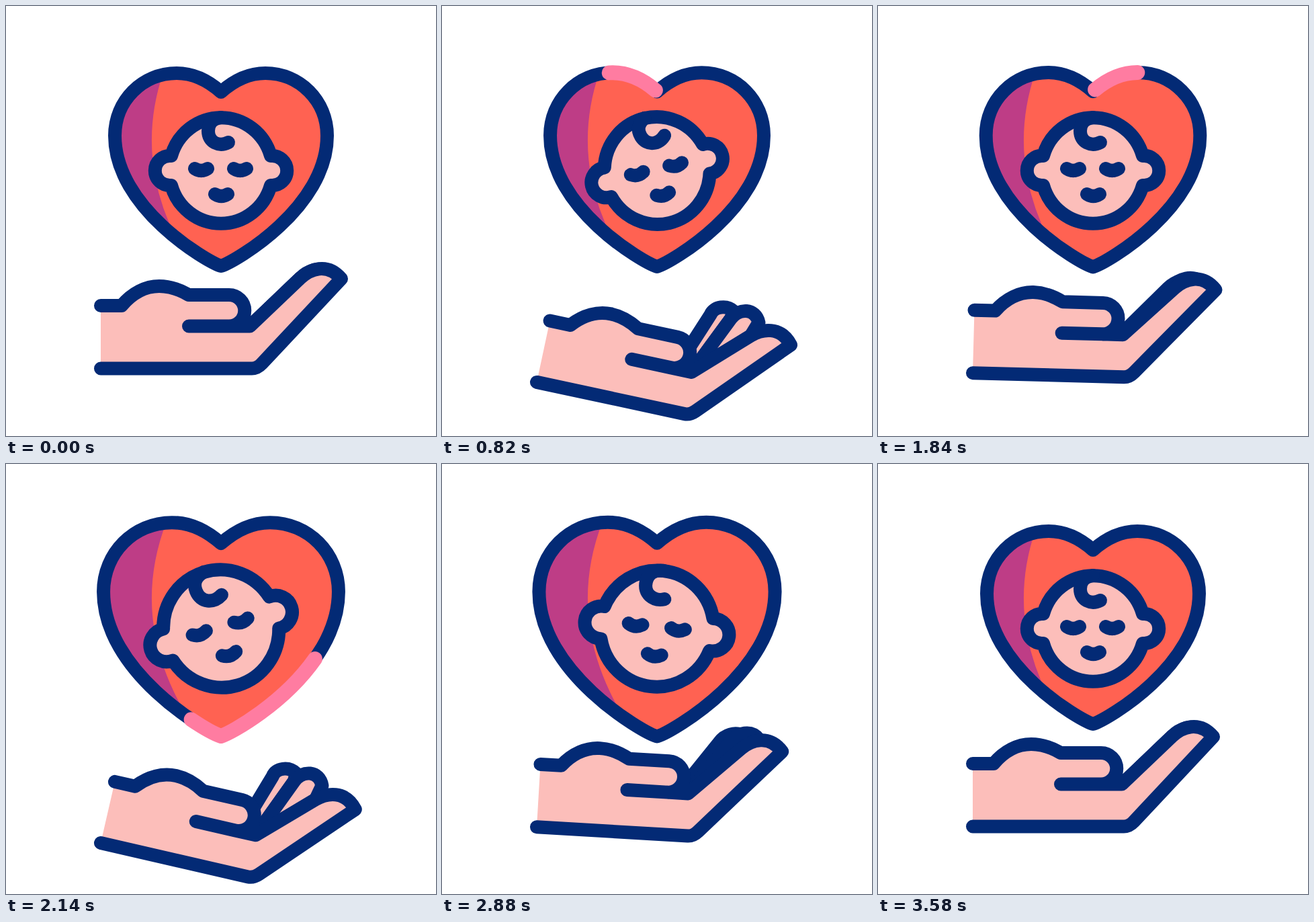
Animation of 640 by 640 pixels, one loop 3.6 s. Source, as an HTML page:

```html
<!DOCTYPE html>
<html lang="en">
<head>
<meta charset="utf-8">
<title>Child care</title>
<style>
  html, body { margin: 0; width: 100%; height: 100%; overflow: hidden; background: #fff; }
  svg { display: block; width: 100vw; height: 100vh; }
  g { stroke: #032a75; stroke-width: 20; stroke-linecap: round; stroke-linejoin: round; fill: #fcbeba; }
  .line { fill: none; }
  #heartFill { stroke: none; fill: #ff6252; }
  #glow { stroke: #ff7ca1; }
</style>
</head>
<body>
<svg viewBox="0 0 640 640">
  <defs>
    <path id="heartShape" d="M320,128C338,112 361,100 386,100C437,100 478,141 478,193C478,300 342,380 320,387C298,380 162,300 162,193C162,141 203,100 254,100C279,100 302,112 320,128Z"/>
    <clipPath id="heartClip"><use id="clipHeart" href="#heartShape"/></clipPath>
  </defs>

  <g id="heartFill"><use href="#heartShape"/></g>
  <path d="M255,50Q166,225 285,400H100V50Z" fill="#be3d86" clip-path="url(#heartClip)"/>
  <g id="heartLine"><use href="#heartShape" class="line"/></g>
  <g id="glow"><path id="glowLine" class="line" pathLength="1"/></g>

  <g id="baby">
    <path d="M246,223A77,78.5 0 0 1 394,223A22.1,22.1 0 1 1 394,267A77,78.5 0 0 1 246,267A22.1,22.1 0 1 1 246,223Z"/>
    <path id="hair" class="line" d="M320,166C306,168 301,176 301,186C301,203 317,210 331,203"/>
    <path class="line" d="M281,242Q290.500,248 300,242M339,242Q348.500,248 358,242M311,280Q320.500,286 330,280"/>
  </g>

  <g id="hand">
    <path id="farFinger"/>
    <path id="nearFinger"/>
    <path d="M141,446H172C188,427 208,417 228,417C245,417 260,423 272,430H332A23,23 0 0 1 332,476.500H363L438,405C452,392 478,381 499,406L381,532Q374,539.500 366,539.500H141M332,476.500H272"/>
  </g>
</svg>
<script>
const LOOP = 3600, BEAT = 1730, SWAY = 1690;
const el = id => document.getElementById(id);

// Cosine ease from 0 to 1 between two times.
function ease(t, from, to) {
  const p = Math.min(1, Math.max(0, (t - from) / (to - from)));
  return (1 - Math.cos(Math.PI * p)) / 2;
}

// Rises from 0 to 1, may hold, then falls back to 0.
const pulse = (t, start, peak, end, release = peak) =>
  ease(t, start, peak) * (1 - ease(t, release, end));

const heartScale = t => 1 + 0.113 * (pulse(t, 60, 350, 770) + pulse(t, 770, 1110, 1640));
const babyScale = t => 1 + 0.118 * (pulse(t, 100, 450, 940) + pulse(t, 900, 1240, 1650));
const babyTurn = t =>
  -25 * pulse(t, 110, 600, 1060) + 14 * pulse(t, 900, 1050, 1240) - 8 * pulse(t, 1150, 1300, 1650);
const hairTurn = t => 0.8 * babyTurn(t - 150);
const handTurn = t => 14.7 * pulse(t, 40, 570, 1480);
const handDrop = t => 24.5 * pulse(t, 0, 430, 1260, 660);
const spread = t => 1.06 * pulse(t, 60, 500, 1700, 600);
const glowHead = t => ease(t, 0, 850);
const glowTail = t => ease(t, 115, 980);

// Finger outline: base, bend, two curve controls, tip.
const KNUCKLE = [363, 477], FRONT_BEND = [438, 405];
const farFinger = {
  closed: [...KNUCKLE, 436, 407, 448, 397, 460, 393, 470, 395],
  open: [345, 458, 370, 386, 372, 373, 390, 366, 403, 374]
};
const nearFinger = {
  closed: [...KNUCKLE, ...FRONT_BEND, 450, 393, 466, 388, 480, 395],
  open: [...KNUCKLE, 402, 386, 410, 367, 435, 362, 444, 383]
};

const mix = ({ closed, open }, k) => closed.map((c, i) => c + (open[i] - c) * k);

// Each finger closes along the edge of the finger in front of it.
function drawFinger(id, p, nextBend) {
  el(id).setAttribute('d',
    `M${p.slice(0, 2)}L${p.slice(2, 4)}C${p.slice(4)}L${nextBend}L${KNUCKLE}`);
}

// Scales about a centre while the line keeps its weight.
function pose(id, cx, cy, scale, turn = 0, weight = 20) {
  el(id).setAttribute('transform',
    `translate(${cx} ${cy}) rotate(${turn}) scale(${scale}) translate(${-cx} ${-cy})`);
  el(id).style.strokeWidth = weight / scale;
}

function draw(t) {
  const phase = period => t < period ? t : t - period;
  const beat = phase(BEAT), sway = phase(SWAY);

  for (const id of ['heartFill', 'heartLine', 'clipHeart']) pose(id, 320, 220, heartScale(beat));
  pose('glow', 320, 220, heartScale(beat), 0, 22);

  const tail = glowTail(sway), length = glowHead(sway) - tail;
  const glow = el('glowLine');
  glow.style.display = length > 0.001 ? '' : 'none';
  glow.setAttribute('stroke-dasharray', `${Math.max(0, length)} 2`);
  glow.setAttribute('stroke-dashoffset', -tail);

  pose('baby', 320, 244.5, babyScale(beat), babyTurn(beat));
  el('hair').setAttribute('transform', `rotate(${hairTurn(beat)} 320 166)`);

  el('hand').setAttribute('transform',
    `translate(0 ${handDrop(sway)}) rotate(${handTurn(sway)} 141 539.5)`);
  const near = mix(nearFinger, spread(sway));
  drawFinger('farFinger', mix(farFinger, spread(sway)), near.slice(2, 4));
  drawFinger('nearFinger', near, FRONT_BEND);
}

el('glowLine').setAttribute('d', el('heartShape').getAttribute('d'));

function frame() {
  draw(performance.now() % LOOP);
  requestAnimationFrame(frame);
}
frame();
</script>
</body>
</html>
```
